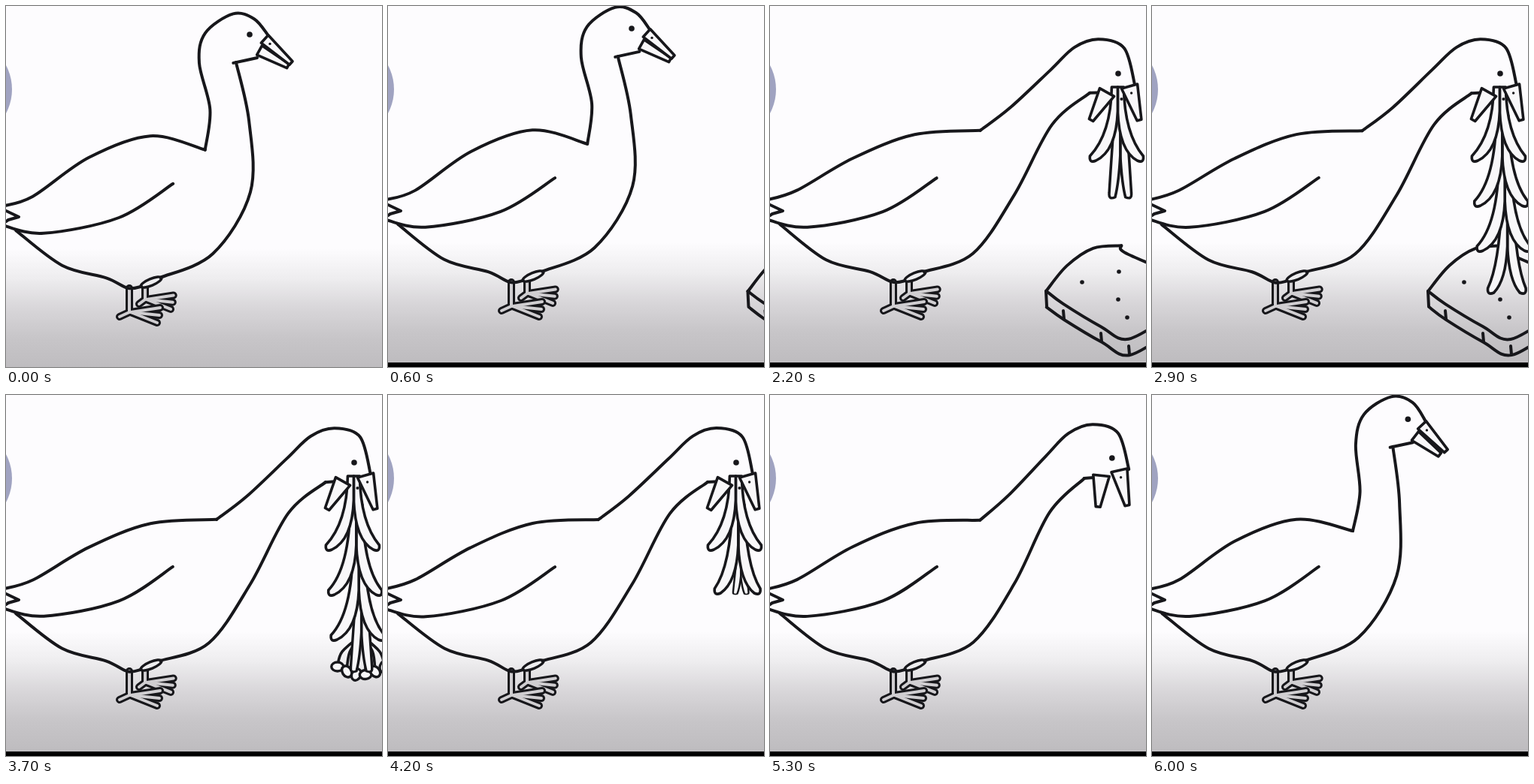
These frames come from a looping animation (500x481 px, 6.1 s). An HTML page with a canvas:

```html
<!DOCTYPE html>
<html lang="en">
<head>
<meta charset="utf-8">
<title>Goose and bread</title>
<style>
html, body { margin: 0; width: 100%; height: 100%; overflow: hidden; background: #fff; }
canvas { display: block; }
</style>
</head>
<body>
<canvas id="stage" width="500" height="481"></canvas>
<script>
const ctx = document.getElementById('stage').getContext('2d');
const LOOP = 6100, STEP = 100, INK = '#17171b', PAPER = '#f8f7f9';

const pts = s => s.split(' ').map(p => p.split(',').map(Number));
const mix = (a, b, u) => a + (b - a) * u;
const span = (t, from, to) => Math.max(0, Math.min(1, (t - from) / (to - from)));
const smooth = u => u * u * (3 - 2 * u);

// Key points for [head up, head down]
const pose = {
  back: ['-6,259 36,246 110,194 192,165 265,184', '-6,259 36,246 110,203 192,171 280,166'],
  nape: ['265,184 271,130 257,68 265,28 302,2 330,9 348,31', '280,166 320,135 373,85 405,55 437,44 471,56 485,106'],
  front: ['306,67 323,145 325,240 275,322 205,354', '425,116 375,158 325,252 270,330 205,354'],
  throat: ['302,68 334,61', '425,116 443,115'],
  eye: ['324,30', '463,90']
};
// Bill halves as root and tip: [head up, head down, wide open]
const bill = {
  lower: ['337,51 375,72', '447,113 440,155', '448,115 427,152'],
  upper: ['344,36 379,68', '472,107 481,154', '478,107 491,152']
};
for (const set of [pose, bill]) {
  for (const k in set) set[k] = set[k].map(pts);
}

const wing = pts('-6,284 50,295 150,274 222,229');
const belly = pts('13,291 75,338 133,354 162,368 180,366');
const tail = pts('-6,262 17,273 3,277 -4,282');
const crust = pts('367,380 395,346 430,323 467,319');
const crustEnd = pts('467,319 472,329 535,356');
const rim = pts('367,380 390,397 440,427 477,444 535,410');
const holes = pts('415,368 464,354 463,391 475,415');

let frame = 0;

// Slight hand-drawn wobble, seeded by point and step
function wobble(x, y) {
  const n = Math.sin(x * 12.99 + y * 78.23 + frame * 3.17) * 43758.5;
  return (n - Math.floor(n) - .5) * .7;
}

const lerp = (a, b, u) => a.map((p, i) => p.map((v, j) => mix(v, b[i][j], u)));

// Blend two poses; the head swings along a raised arc
const swing = ([a, b], u) => lerp(a, b, u)
  .map(([x, y], i) => [x, y - .33 * (b[i][0] - a[i][0]) * u * (1 - u)]);

function stroke(width) {
  ctx.lineWidth = width;
  ctx.stroke();
}

function shape(fill, width) {
  ctx.fillStyle = fill;
  ctx.fill();
  stroke(width);
}

function line(list, width) {
  ctx.beginPath();
  list.forEach(p => ctx.lineTo(...p));
  stroke(width);
}

// Smooth line through all points
function curve(list, width = 4) {
  const p = list.map(([x, y]) => [x + wobble(x, y), y + wobble(y, x)]);
  const n = p.length - 1;
  ctx.beginPath();
  ctx.moveTo(...p[0]);
  for (let i = 0; i < n; i++) {
    const a = p[Math.max(0, i - 1)], b = p[i], c = p[i + 1], d = p[Math.min(n, i + 2)];
    ctx.bezierCurveTo(b[0] + (c[0] - a[0]) / 6, b[1] + (c[1] - a[1]) / 6,
      c[0] - (d[0] - b[0]) / 6, c[1] - (d[1] - b[1]) / 6, ...c);
  }
  stroke(width);
}

function dot(x, y, r, fill = INK) {
  ctx.beginPath();
  ctx.arc(x, y, r, 0, 7);
  ctx.fillStyle = fill;
  ctx.fill();
}

function backdrop() {
  const g = ctx.createLinearGradient(0, 315, 0, 475);
  ['#fdfcfe', '#eeedef', '#d8d6d9', '#c7c5c8', '#bebcbf']
    .forEach((c, i) => g.addColorStop(i / 4, c));
  ctx.fillStyle = g;
  ctx.fillRect(0, -10, 500, 485);
  ctx.fillStyle = '#000';
  ctx.fillRect(0, 475, 500, 20);
}

function drawBread(dx, size) {
  if (!size) return;
  ctx.save();
  ctx.translate(dx + 468, 362);
  ctx.scale(size, size);
  ctx.translate(-468, -362);
  const w = 4 / Math.max(size, .4);
  [crust, crustEnd, rim, rim.map(([x, y]) => [x + 1, y + 21])].forEach(p => curve(p, w));
  rim.forEach(([x, y], i) => line([[x, y + (i ? 9 : 0)], [x + 1, y + 20]], w));
  holes.forEach(([x, y]) => dot(x, y, 2.8));
  ctx.restore();
}

// One half of a nested bill, hanging from its hinge
function blade(side, open, top) {
  const x = v => v * side;
  const tx = mix(15, side < 0 ? 37 : 34, open), ty = mix(88, 96, open);
  ctx.beginPath();
  ctx.moveTo(0, top);
  ctx.lineTo(x(8), top);
  ctx.quadraticCurveTo(x(mix(13, 9, open)), mix(50, 62, open), x(tx), ty - 4);
  ctx.quadraticCurveTo(x(tx + 1), ty + 6, x(tx - 8), ty + 2);
  ctx.quadraticCurveTo(x(2), mix(70, 85, open), 0, 32);
  ctx.closePath();
  shape(PAPER, 3.6);
}

function drawChain(count) {
  for (let k = 4; k >= 1; k--) {
    const grow = span(count, k, k + .7), open = span(count, k + .7, k + 1.3);
    if (!grow) continue;
    ctx.save();
    ctx.translate(459 + 3.4 * k, 48 + 60 * k);
    ctx.scale(mix(.6, 1, grow), mix(.25, 1, grow));
    for (const side of [1, -1]) blade(side, open, k > 1 ? -22 : 0);
    dot(5, 16, 2);
    ctx.restore();
  }
}

// Crumpled remains gathered round the lowest bill
function drawCrumbs(size) {
  if (!size) return;
  for (let i = 0; i < 6; i++) {
    const x = 472 + (i - 2.5) * 12.5 * size, y = 362 + 11 * Math.sin(i * Math.PI / 5) * size;
    curve([[472, 320], [mix(472, x, .8), 342], [x, y]], 3.6);
    ctx.beginPath();
    ctx.ellipse(x, y, 8 * size, 6 * size, i, 0, 7);
    shape(PAPER, 3.4);
  }
}

function drawBill(bend, count) {
  const open = span(count, .35, 1), half = mix(7, 11, bend);
  for (const k in bill) {
    const [[x, y], [tx, ty]] = lerp(swing(bill[k], bend), bill[k][2], open);
    const len = Math.hypot(tx - x, ty - y);
    const nx = (y - ty) / len, ny = (tx - x) / len;
    ctx.beginPath();
    for (const [px, py, r] of [[x, y, half], [tx, ty, 3], [tx, ty, -3], [x, y, -half]]) {
      ctx.lineTo(px + nx * r, py + ny * r);
    }
    ctx.closePath();
    shape(PAPER, 3.6);
    if (k === 'upper') dot(mix(x, tx, .2), mix(y, ty, .2), 1.7);
  }
}

// Leg and toes: wide ink strokes with a lighter core
function drawFoot(x, y, scale, heel) {
  const limbs = [[[x, 368], [x, y]], [[x, y], [x - heel, y + 6]]];
  for (let i = 0; i < 3; i++) {
    limbs.push([[x + 2, y], [x + (41 - 2 * i * i / 2) * scale, y + (i * 10 - 6) * scale]]);
  }
  for (const [color, width] of [[INK, 10], ['#d0ced1', 4]]) {
    ctx.strokeStyle = color;
    limbs.forEach(l => line(l, width));
  }
  ctx.strokeStyle = INK;
}

function drawGoose(bend, count) {
  drawFoot(185, 383, .92, 8);
  drawFoot(164, 400, 1, 13);
  ctx.beginPath();
  ctx.ellipse(193, 360, 15, 4.5, -.4, 0, 7);
  shape('#ededef', 3.4);
  curve(wing);
  curve(belly);
  line(tail, 4);
  for (const k of ['back', 'nape', 'front', 'throat']) curve(swing(pose[k], bend));
  drawChain(count);
  drawBill(bend, count);
  dot(...swing(pose.eye, bend)[0], 3.8);
}

function draw(t) {
  frame = t / STEP;
  const bend = smooth(span(t, 700, 1400)) - span(t, 5250, 6100);
  const beaks = 5 * (span(t, 1400, 2900) - span(t, 3560, 5290));
  ctx.lineCap = ctx.lineJoin = 'round';
  ctx.strokeStyle = INK;
  ctx.save();
  ctx.translate(0, 8 * (1 - span(t, 0, 300)));
  backdrop();
  drawBread(156 * (1 - span(t, 400, 1100)), 1 - span(t, 3000, 3700));
  drawCrumbs(span(t, 3200, 3600) - span(t, 3750, 4000));
  drawGoose(bend, beaks);
  ctx.restore();
  dot(-60, 111, 68, '#a0a3c1');
}

let start;
function tick(now) {
  start ??= now;
  draw(Math.floor(((now - start) % LOOP) / STEP) * STEP);
  requestAnimationFrame(tick);
}
draw(0);
requestAnimationFrame(tick);
</script>
</body>
</html>
```
